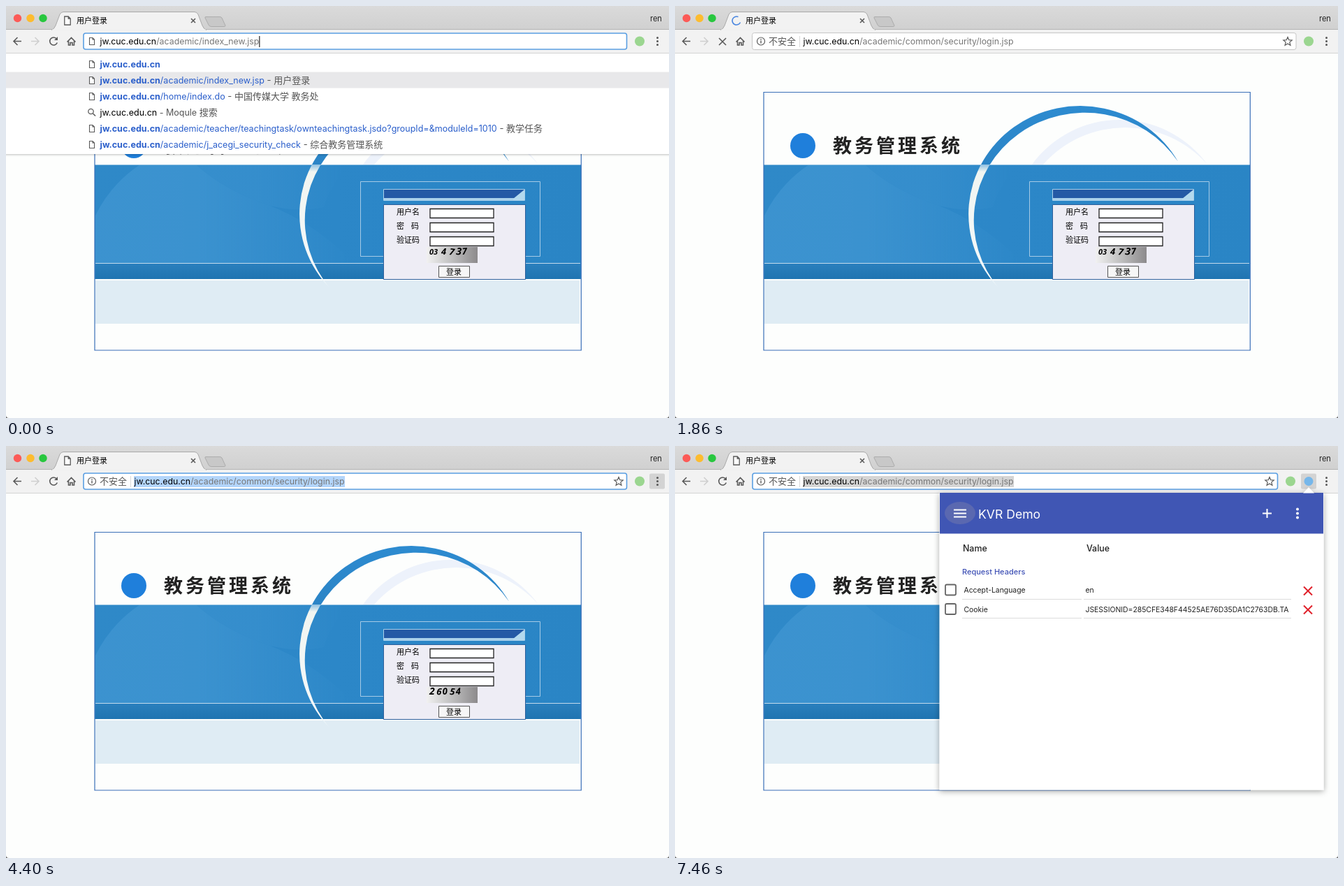
Recreate the animation shown at these times as an HTML page. Size 949 px wide and 590 px high, loop 8000 ms.

```html
<!DOCTYPE html>
<html lang="zh">
<head>
<meta charset="utf-8">
<title>Login demo</title>
<style>
  html, body { margin: 0; width: 100%; height: 100%; overflow: hidden; background: #555; }
  svg { display: block; width: 949px; height: 590px; background: #fdfefd; border-radius: 0 0 4px 4px; }
  text { font-family: Inter, "Noto Sans CJK SC", "Noto Sans CJK", sans-serif; white-space: pre; }
  .url { font-size: 12.35px; }
  #rows .url { font-size: 12.5px; }
  #rows .cjk, .cjk { font-size: 13px; fill: #555; }
  .link { fill: #2b5fcb; }
  .host { font-weight: 700; }
  .label { font-size: 11px; }
  .cell { font-size: 10.4px; fill: #222; }
  .line { fill: none; stroke: #5a5a5a; stroke-width: 1.6; }
  #captcha { font: italic 700 13px "Noto Sans", sans-serif; }
</style>
</head>
<body>
<svg viewBox="0 0 949 590">
  <defs>
    <linearGradient id="title" x2="0" y2="1"><stop stop-color="#dadada"/><stop offset="1" stop-color="#d0d0d0"/></linearGradient>
    <linearGradient id="ring" gradientUnits="userSpaceOnUse" x1="0" x2="0" y1="143" y2="405">
      <stop stop-color="#2d8bd0"/><stop offset=".320" stop-color="#2b84c6"/>
      <stop offset=".321" stop-color="#8fc0e2"/><stop offset=".36" stop-color="#f1f5f1"/>
      <stop offset=".94" stop-color="#f4f8fa"/><stop offset="1" stop-color="#dfecf4"/>
    </linearGradient>
    <linearGradient id="band"><stop stop-color="#2f89c8"/><stop offset=".5" stop-color="#2c87c8"/><stop offset="1" stop-color="#2a85c5"/></linearGradient>
    <linearGradient id="glow"><stop offset=".4" stop-color="#5aa9e0"/><stop offset="1" stop-color="#5aa9e0" stop-opacity="0"/></linearGradient>
    <linearGradient id="strip" x2="0" y2="1"><stop stop-color="#2a7fbd"/><stop offset="1" stop-color="#1f74b1"/></linearGradient>
    <linearGradient id="grey"><stop stop-color="#f1f1f1"/><stop offset=".45" stop-color="#c4c4c4"/><stop offset="1" stop-color="#8c8a8c"/></linearGradient>
    <filter id="shadow" x="-20%" y="-20%" width="140%" height="140%"><feDropShadow dx="0" dy="2" stdDeviation="4" flood-opacity=".35"/></filter>
    <filter id="softShadow"><feDropShadow dx="0" dy="1" stdDeviation="1.6" flood-opacity=".25"/></filter>
    <clipPath id="bandClip"><path d="M128 228H822V368H128z"/></clipPath>
    <clipPath id="cellClip"><path d="M585 220H880V248H585z"/></clipPath>
    <path id="doc" d="M-3.5 -5H1L3.5 -2.5V5H-3.5zM1 -5V-2.5H3.5" fill="#fff" stroke="#5a5a5a" stroke-width="1.1"/>
  </defs>

  <g id="page">
    <path d="M511 227A155 155 0 0 1 762 227A156.7 156.7 0 0 0 527 227z" fill="#edf2fb"/>
    <path d="M127 227.500H823V391H127z" fill="url(#band)"/>
    <g clip-path="url(#bandClip)" fill="url(#glow)" opacity=".3">
      <path d="M128 300Q150 255 192 227H272Q312 264 378 286Q440 310 500 369H128z"/>
      <path d="M272 227H490Q462 262 455 288Q420 296 378 286Q312 264 272 227z" opacity=".6"/>
    </g>
    <path d="M128 369H822V391H128z" fill="url(#strip)"/>
    <path d="M128 368.500H822" stroke="#c2daec"/>
    <path d="M128 393H821V455H128z" fill="#dfecf4"/>
    <path d="M464.400 405.100A160 155 0 1 1 720 222.800A158.970 154 0 1 0 464.400 405.100z" fill="url(#ring)"/>
    <path d="M127 123.500H823.300V493H127z" fill="none" stroke="#3a6fb8" stroke-width="1.200"/>
    <circle cx="183" cy="200" r="18" fill="#1f7fdb"/>
    <text x="226" y="210" font-size="27" font-weight="700" letter-spacing="4" fill="#222">教务管理系统</text>

    <path d="M507.500 251.500H764.500V358.500H507.500z" fill="none" stroke="#a5cae6"/>
    <path d="M540.500 262.500H742.500V278.500H540.500z" fill="#2459a5" stroke="#a9d0ea"/>
    <path d="M541 276.500H742" stroke="#a9d0ea" stroke-width="3"/>
    <path d="M726 276L742 263V278H726z" fill="#b4d9ee"/>
    <path d="M540.500 284.500H743.500V391.500H540.500z" fill="#eeedf5" stroke="#2c5f9c"/>
    <g class="label">
      <text x="559" y="299">用户名</text>
      <text x="559" y="319">密</text><text x="580" y="319">码</text>
      <text x="559" y="339">验证码</text>
    </g>
    <path d="M602 345H675V368H602z" fill="url(#grey)"/>
    <path d="M607 290.500H698V303.500H607zM607 310.500H698V323.500H607zM607 330.500H698V343.500H607z" fill="#fff" stroke="#222" stroke-width="1.3"/>
    <text id="captcha" y="356"></text>
    <path d="M619.500 372.500H663.500V388.500H619.500z" fill="#f6f6f6" stroke="#555"/>
    <text x="630" y="385" class="label">登录</text>
  </g>

  <g id="dropdown">
    <path d="M-20 50H969V212H-20z" fill="#fff" filter="url(#softShadow)"/>
    <path id="rowMark" d="M0 0H949V23H0z" fill="#e8e8ea"/>
    <g id="rows"></g>
  </g>

  <g id="chrome">
    <path d="M0 0H949V34H0z" fill="url(#title)"/>
    <path d="M0 34H949V67H0z" fill="#f2f2f2"/>
    <path d="M0 33.500H949" stroke="#b4b4b4"/>
    <path d="M0 67.500H949" stroke="#d4d4d4"/>
    <path d="M65 34.500Q69 33 71 28L77 12Q79 8.500 82 8.500H270Q273 8.500 275 12L281 28Q283 33 287 34.500" fill="#f2f2f2" stroke="#a9a9a9"/>
    <path d="M66 34.500H286" stroke="#f2f2f2" stroke-width="2"/>
    <path d="M286 15.500H306Q308 15.500 309 17L314 28Q314 29.500 312 29.500H294Q291 29.500 290 27L285 17Q284.500 15.500 286 15.500z" fill="#c8c8c8" stroke="#acacac"/>
    <circle cx="16.500" cy="17.500" r="5.700" fill="#fc5b57"/>
    <circle cx="35" cy="17.500" r="5.700" fill="#fdbc2f"/>
    <circle cx="53" cy="17.500" r="5.700" fill="#28c73f"/>
    <use id="tabDoc" href="#doc" transform="translate(88 21) scale(1.2)"/>
    <path id="spinner" d="M6 0A6 6 0 1 1 0 -6" class="line"/>
    <text x="101" y="25" class="label" font-weight="500">用户登录</text>
    <path d="M265 18L271 24M271 18L265 24" class="line" stroke-width="1.300"/>
    <text x="922" y="22" font-size="11" fill="#222">ren</text>
    <path d="M22 50.500H11M16.500 45L11 50.500L16.500 56" class="line"/>
    <path d="M36 50.500H47M41.500 45L47 50.500L41.500 56" class="line" style="stroke:#cfcfcf"/>
    <g id="reload"><path d="M72.500 47A5.500 5.500 0 1 0 73.300 52.500" class="line"/><path d="M74 44V49H69z" fill="#5a5a5a"/></g>
    <path id="stop" d="M63 46L73 56M73 46L63 56" class="line"/>
    <path d="M87.500 51.500L93.500 45.500L99.500 51.500M89.500 50.500V56H92V52.500H95V56H97.500V50.500" class="line" stroke-width="1.400"/>

    <rect id="bar" rx="3" fill="#fff"/>
    <use id="urlDoc" href="#doc" x="123" y="50.500"/>
    <g id="insecure">
      <circle cx="123" cy="50.500" r="5.500" class="line" style="stroke-width:1.200"/>
      <path d="M123 49.500V53.500M123 47V48.500" class="line" style="stroke-width:1.400"/>
      <text x="134" y="55" class="cjk">不安全</text>
      <path d="M178.500 43V59" stroke="#d8d8d8"/>
    </g>
    <rect id="selection" x="183" y="43" height="16"/>
    <text id="url" y="55" class="url"><tspan>jw.cuc.edu.cn</tspan><tspan id="path" fill="#777"></tspan></text>
    <path id="caret" d="M0 43V59" stroke="#222" stroke-width="1.200"/>
    <g id="actions">
      <path id="star" d="M877 44.500L878.800 48.700L883.200 49L879.800 51.900L880.900 56.300L877 53.900L873.100 56.300L874.200 51.900L870.800 49L875.200 48.700z" class="line" style="stroke-width:1.200"/>
      <circle cx="907" cy="50.500" r="7" fill="#9bd690"/>
    </g>
    <g id="extension">
      <rect x="896" y="39.500" width="22" height="22" rx="2" fill="#d3d3d3"/>
      <circle cx="907" cy="50.500" r="6.500" fill="#76b7ea"/>
    </g>
    <rect id="menuHover" x="921" y="39.500" width="22" height="22" rx="2" fill="#d3d3d3"/>
    <g fill="#555"><circle cx="932.500" cy="45.500" r="1.500"/><circle cx="932.500" cy="50.500" r="1.500"/><circle cx="932.500" cy="55.500" r="1.500"/></g>
  </g>

  <g id="menu">
    <rect x="921.500" y="64.500" width="240" height="396" rx="4" fill="#ebeeed" stroke="#c9cccb" filter="url(#shadow)"/>
    <path id="menuMark" d="M940 91H949V131H940z" fill="#dfe2e3"/>
    <circle cx="950" cy="79" r="6" fill="#5caee8"/>
    <path d="M943.500 94H955V106H943.500z" fill="#3b83ee"/>
    <circle cx="950" cy="121" r="5.500" fill="#444"/>
    <path d="M945.500 139.500H955V150.500H945.500z" fill="#e0e0e0" stroke="#aaa"/>
    <path d="M922 161H949M922 222H949M922 282.500H949M922 311H949M922 388.500H949M922 417.500H949" stroke="#d2d5d4" stroke-width="1.500"/>
    <g id="menuText" class="label"></g>
  </g>

  <g id="popup">
    <path d="M378.500 67H900L907 60L914 67H928.500V492.500H378.500z" fill="#fff" filter="url(#shadow)"/>
    <g id="popupBody">
      <path d="M379 67H928V125.500H379z" fill="#4056b4"/>
      <path d="M899 67.500L907 59L915 67.500z" fill="#fff"/>
      <ellipse id="ripple" cx="408" cy="96" rx="22" ry="16" fill="#5a68b0"/>
      <path d="M399 91.500H417M399 96.500H417M399 101.500H417M841 96.500H854M847.500 90V103" stroke="#fff" stroke-width="2"/>
      <g fill="#fff"><circle cx="891" cy="90.500" r="2"/><circle cx="891" cy="96.500" r="2"/><circle cx="891" cy="102.500" r="2"/>
        <text x="434" y="103.500" font-size="17.600">KVR Demo</text></g>
      <g font-size="12.400" font-weight="500" fill="#222"><text x="412" y="151">Name</text><text x="589" y="151">Value</text></g>
      <text x="411" y="183.500" font-size="11" font-weight="500" fill="#3f51b5">Request Headers</text>
      <g class="cell">
        <text x="413.500" y="210">Accept-Language</text><text x="587.500" y="210">en</text>
        <text x="413.500" y="237.500">Cookie</text>
        <text x="587.500" y="237.500" clip-path="url(#cellClip)">JSESSIONID=285CFE348F44525AE76D35DA1C2763DB.TA</text>
      </g>
      <path d="M411 219.500H582M585 219.500H882M411 246.500H582M585 246.500H882" stroke="#dcdcdc"/>
      <g fill="none" stroke="#666" stroke-width="1.800"><rect x="387" y="198.500" width="15" height="15" rx="2"/><rect x="387" y="226" width="15" height="15" rx="2"/></g>
      <path d="M900 201.500L912 213.500M912 201.500L900 213.500M900 228.500L912 240.500M912 228.500L900 240.500" stroke="#e0202a" stroke-width="2"/>
    </g>
  </g>
</svg>
<script>
const $ = id => document.getElementById(id);
const show = (id, on) => $(id).style.display = on ? '' : 'none';
const attr = (id, name, value) => $(id).setAttribute(name, value);
const ramp = (t, from, to) => Math.min(1, Math.max(0, (t - from) / (to - from)));
const digit = (char, x, turn, size = 13) =>
  `<tspan x="${x}" rotate="${turn}" font-size="${size}">${char}</tspan>`;

const suggestions = [
  ['', ''],
  ['/academic/index_new.jsp', '用户登录'],
  ['/home/index.do', '中国传媒大学 教务处'],
  null,
  ['/academic/teacher/teachingtask/ownteachingtask.jsdo?groupId=&amp;moduleId=1010', '教学任务'],
  ['/academic/j_acegi_security_check', '综合教务管理系统']
];
$('rows').innerHTML = suggestions.map((row, i) => {
  const y = 83 + 23 * i;
  const note = s => s && `<tspan class="cjk"> - ${s}</tspan>`;
  const icon = row ? `<use href="#doc" x="123" y="${y + .5}"/>`
    : `<path d="M124.500 ${y + 2}L128 ${y + 5.5}" class="line"/><circle cx="121.500" cy="${y - 1}" r="3.700" class="line" style="stroke-width:1.300"/>`;
  const label = row ? `<tspan class="link host">jw.cuc.edu.cn</tspan><tspan class="link">${row[0]}</tspan>${note(row[1])}`
    : `jw.cuc.edu.cn<tspan fill="#555"> - Moqule</tspan><tspan class="cjk"> 搜索</tspan>`;
  return `${icon}<text x="134.500" y="${y + 4.5}" class="url">${label}</text>`;
}).join('');

// Each group: first baseline, then one label per line.
$('menuText').innerHTML = [[179, '打打打'], [239, '历下书'], [301, '缩'], [328, '打投查更'], [407, '修'], [435, '设帮']]
  .map(([y, chars]) => [...chars].map((c, i) => `<text x="941" y="${y + 16.4 * i}">${c}</text>`).join('')).join('');

const oldCode = digit('0', 606, 0, 11) + digit('3', 612, 0, 11) + digit('4', 623, 0)
  + digit('7', 634, 8) + digit('3', 644, 4, 14) + digit('7', 653, -4);
const newCode = digit('2', 606, 0, 14) + digit('6', 616, 4) + digit('0', 625, -4)
  + digit('5', 635, 4) + digit('4', 644, -4);
let code;

function draw() {
  const t = performance.now() % 8000;
  const home = t >= 130 && t < 1260;
  const typing = t < 1600;
  const loading = t >= 1600 && t < 2200;
  const committed = t >= 1860;
  const focused = typing || t >= 3660;

  show('dropdown', typing);
  attr('rowMark', 'transform', `translate(0 ${home ? 117.5 : 94.5})`);

  show('tabDoc', !loading);
  show('spinner', loading);
  attr('spinner', 'transform', `translate(88 21) rotate(${(committed ? .4 : -.3) * t})`);
  $('spinner').style.stroke = committed ? '#4a86e0' : '#888';
  show('stop', loading);
  show('reload', !loading);

  const nextCode = t < 1990 ? oldCode : newCode;
  if (nextCode !== code) $('captcha').innerHTML = code = nextCode;

  const path = committed ? '/academic/common/security/login.jsp'
    : home ? '/home/index.do' : '/academic/index_new.jsp';
  if ($('path').textContent !== path) $('path').textContent = path;
  const urlX = committed ? 183.5 : 134.5;
  const urlWidth = $('url').getComputedTextLength();
  attr('url', 'x', urlX);
  show('urlDoc', !committed);
  show('insecure', committed);
  show('caret', typing && !(t >= 730 && t < 1260));
  attr('caret', 'transform', `translate(${urlX + urlWidth + .5} 0)`);
  show('selection', t >= 3730);
  attr('selection', 'width', urlWidth + 1);
  attr('selection', 'fill', t < 7330 ? '#b3d5fb' : '#d5d5d5');

  const grow = ramp(t, 6800, 7060);
  const shift = 26 * grow * (2 - grow);
  const inset = focused ? .5 : 0;
  attr('bar', 'x', 110.5 + inset);
  attr('bar', 'y', 38.5 + inset);
  attr('bar', 'width', 778.5 - shift - 2 * inset);
  attr('bar', 'height', 24 - 2 * inset);
  attr('bar', 'stroke', focused ? '#5b9fe2' : '#c6c6c6');
  attr('bar', 'stroke-width', focused ? 1.6 : 1);
  attr('actions', 'transform', `translate(${-shift} 0)`);
  show('star', !typing);
  attr('extension', 'opacity', grow);

  attr('menuHover', 'opacity', ramp(t, 4190, 4330) * (1 - ramp(t, 6800, 6930)));
  show('menu', t >= 4530 && t < 7000);
  attr('menu', 'opacity', 1 - ramp(t, 6800, 7000));
  show('menuMark', t >= 5060);

  show('popup', t >= 7330);
  show('popupBody', t >= 7400);
  show('ripple', t >= 7460);
  requestAnimationFrame(draw);
}
draw();
</script>
</body>
</html>
```
